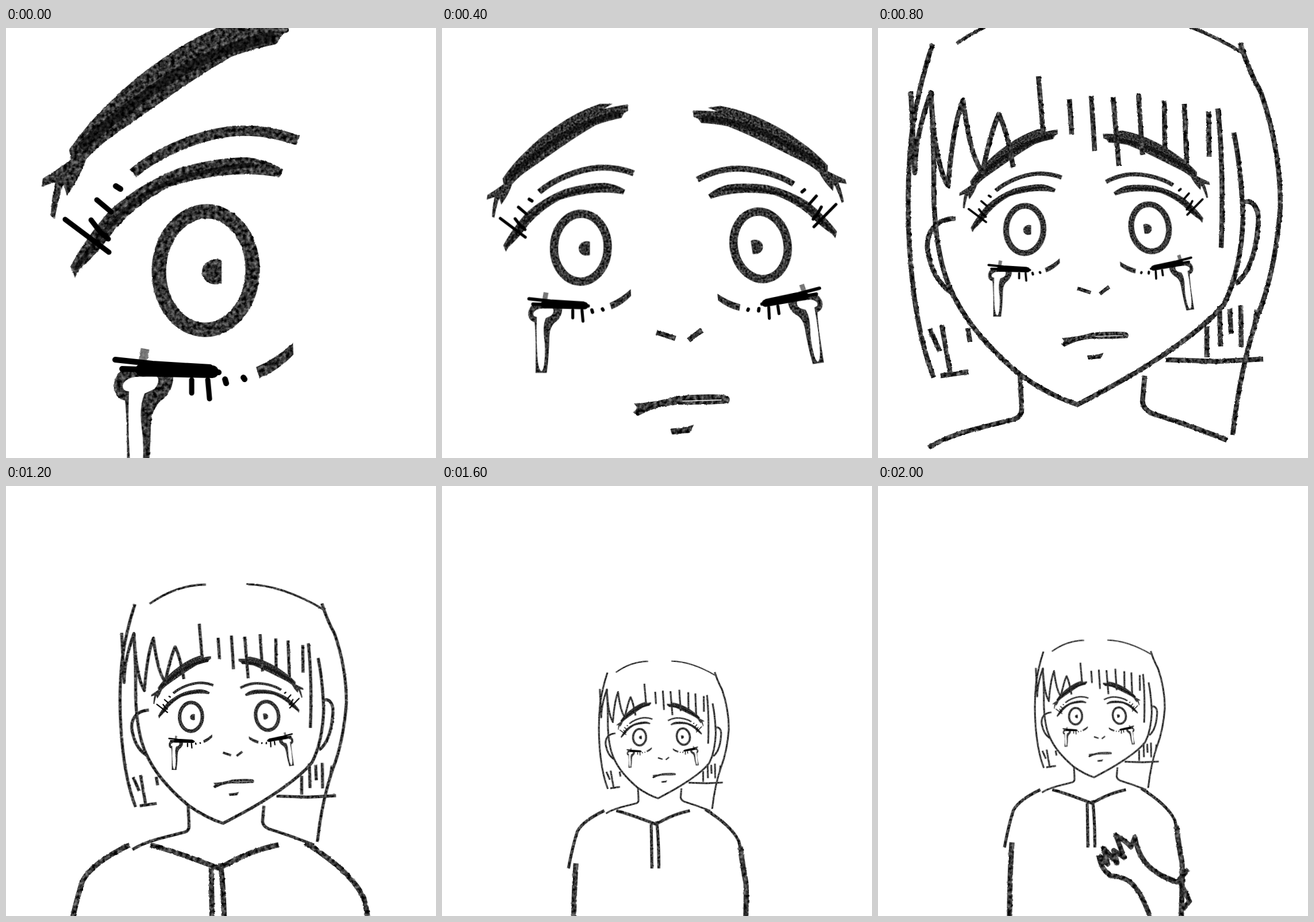
An HTML page without scripts for the animation above (2.4 s loop, 748 px wide and 748 px high).

```html
<!DOCTYPE html>
<html lang="en">
<head>
<meta charset="utf-8">
<title>Zooming out sketch</title>
<style>
  html, body { margin: 0; width: 100%; height: 100%; overflow: hidden; background: #fff; }
  svg { display: block; width: 100vw; height: 100vh; }
  path, ellipse { fill: none; stroke: #000; stroke-linecap: butt; stroke-linejoin: round; }
  .solid { fill: #000; stroke: none; }
  .gap { fill: #fff; stroke: none; }
  .pen path { stroke-linecap: round; }
  .chalk { filter: url(#chalk); }
  .shine { stroke: #fff; }

  /* hard cuts, each 400 ms */
  #cam, .step { animation: 2400ms step-end infinite; }
  #cam { animation-name: zoom; }
  .s1 { animation-name: s1; }
  .s2 { animation-name: s2; }
  .s3 { animation-name: s3; }
  .s4 { animation-name: s4; }
  .s5 { animation-name: s5; }
  @keyframes zoom {
    0% { transform: translate(-291.8px, -455.3px) scale(2.504); }
    16.66% { transform: translate(-124.8px, -120.5px) scale(1.4347); }
    33.33% { transform: none; }
    50% { transform: translate(166.5px, 188.5px) scale(.608); }
    66.66% { transform: translate(254.6px, 314.7px) scale(.349); }
    83.33% { transform: translate(254.6px, 278.2px) scale(.349); }
  }
  @keyframes s1 { 0% { visibility: hidden; } 16.66% { visibility: visible; } }
  @keyframes s2 { 0% { visibility: hidden; } 33.33% { visibility: visible; } }
  @keyframes s3 { 0% { visibility: hidden; } 50% { visibility: visible; } }
  @keyframes s4 { 0% { visibility: hidden; } 66.66% { visibility: visible; } }
  @keyframes s5 { 0% { visibility: hidden; } 83.33% { visibility: visible; } }
</style>
</head>
<body>
<svg viewBox="0 0 748 748">
  <defs>
    <!-- crayon: slightly rough edge plus soft pale grain -->
    <filter id="chalk" color-interpolation-filters="sRGB">
      <feTurbulence type="fractalNoise" baseFrequency=".16" numOctaves="4" seed="4" result="noise"/>
      <feColorMatrix in="noise" values="0 0 0 0 1  0 0 0 0 1  0 0 0 0 1  .95 0 0 0 -.27" result="grain"/>
      <feDisplacementMap in="SourceGraphic" in2="noise" scale="3" xChannelSelector="R" yChannelSelector="G" result="rough"/>
      <feComposite in="grain" in2="rough" operator="in" result="specks"/>
      <feMerge><feMergeNode in="rough"/><feMergeNode in="specks"/></feMerge>
    </filter>

    <g id="eye">
      <g class="chalk">
        <!-- brow -->
        <path class="solid" d="M110 212Q142 165 180 130Q225 85 270 55Q335 8 406 -15L444 -15L416 1L458 -8L490 -13L491 6L478 14L471 28Q430 36 392 50Q345 77 290 115L190 185Q160 205 139 229Q128 262 106 291L100 272Q92 292 85 331L78 328Q79 294 86 268L62 276L64 262Q90 246 113 229Z"/>
        <!-- crease and lid -->
        <path stroke-width="18" d="M221 253C265 214 340 184 400 179Q455 176 508 196"/>
        <path class="solid" d="M112 415Q138 366 180 318Q230 272 300 244Q365 225 420 225Q455 229 482 246L476 260Q440 253 395 255Q340 259 285 276Q232 303 190 350Q160 392 128 420L120 434Z"/>
        <ellipse cx="347.5" cy="422" rx="81.5" ry="103" stroke-width="25" transform="rotate(2 348 422)"/>
        <path class="solid" d="M375 404C360 398 341 408 341 424C341 442 360 450 375 444Z"/>
        <path class="solid" d="M435 590Q470 575 499 548L500 568Q475 595 441 609Z"/>
        <!-- tear -->
        <path stroke-width="15" stroke-opacity=".6" d="M238 580L242 558"/>
        <path class="solid" d="M200 596Q186 610 188 628Q192 645 207 648Q212 690 210 802L244 802Q251 750 252 690Q254 658 274 645Q290 632 291 606Z"/>
      </g>
      <path class="gap" d="M203 622Q206 610 225 607L262 606Q270 613 258 628L241 636Q231 660 236 695Q241 730 237 767Q235 795 227 797Q219 790 217 767Q211 700 214 632Q203 632 203 622Z"/>
      <!-- darker second pass -->
      <g opacity=".55">
        <path stroke-width="8" d="M122 418Q180 335 240 290Q310 248 432 238"/>
        <path stroke-width="18" d="M130 208Q200 142 300 78Q380 32 468 14"/>
      </g>
      <!-- lashes -->
      <g class="pen">
        <path stroke-width="9" d="M103 333L179 390M148 334L164 355L178 367M158 299L183 320M323 612V635M351 612L354 645"/>
        <path stroke-width="10" d="M191 275L199 280M190 577L255 584L355 590M202 593L370 599M381 611L383 618M413 608L415 611"/>
        <path stroke-width="22" d="M236 595L359 598"/>
      </g>
    </g>
  </defs>

  <rect width="748" height="748" fill="#fff"/>
  <g id="cam">
    <use href="#eye" transform="translate(116.5 181.8) scale(.3994)"/>

    <g class="step s1">
      <use href="#eye" transform="translate(473.5 347.5) rotate(-8.5) scale(-.3994 .3994) translate(-347 -422)"/>
      <g transform="translate(87 84) scale(.697)">
        <g class="chalk">
          <path stroke-width="9" d="M373 529L406 540M429 543L452 525"/>
          <path class="solid" d="M334 653Q370 652 410 640Q450 636 492 638Q505 642 498 653Q455 656 410 655Q375 658 355 668L340 675L332 668L340 661Z"/>
          <path class="solid" d="M397 697L425 694L438 690L432 704L400 707Z"/>
        </g>
        <path class="shine" stroke-width="1.5" d="M418 649L486 647"/>
      </g>
    </g>

    <g class="step s2">
      <g class="chalk" stroke-width="8.5">
        <!-- crown and sides -->
        <path stroke-width="6" d="M137 27Q215 -28 298 -28M414 -29Q515 -28 636 44"/>
        <path d="M95 28Q68 110 58 190Q45 320 62 460Q74 550 97 608"/>
        <path d="M630 26Q645 75 666 112Q700 210 700 310Q692 420 661 500Q630 590 617 708M659 490L655 520"/>
        <!-- fringe -->
        <path d="M57 110L64 252Q64 190 92 112Q98 235 122 275Q130 170 148 125Q160 225 182 250Q195 185 210 150Q225 180 235 242"/>
        <path d="M279 84L288 190M333 124L337 185M371 118L377 214M409 121L419 240M453 114L460 220M498 126L499 211M533 132L537 236M575 145L576 224M591 140Q602 240 597 382"/>
        <!-- face, ears, neck -->
        <path d="M92 112Q98 210 97 290Q100 400 128 458Q160 530 247 603Q300 640 347 655Q440 607 490 573Q570 520 602 480Q632 420 635 330Q632 245 619 182"/>
        <path d="M135 331C95 333 84 360 86 385Q95 440 128 460M632 304C652 294 665 315 661 345Q655 420 622 445"/>
        <path d="M247 600L250 662Q250 676 238 680L160 700Q115 713 88 730M464 605L460 650Q462 664 478 671Q540 690 607 717"/>
        <!-- hair ends -->
        <path d="M90 523L107 562M111 517L126 603M109 605L157 598M156 522L160 546M572 519V573M594 484L596 554M612 488L614 532M631 482L632 555M500 577L590 580L670 576"/>
      </g>
    </g>

    <g class="step s3" transform="translate(-273.8 -310) scale(1.645)">
      <g class="chalk" stroke-width="9">
        <path d="M215 624Q150 655 133 687Q119 730 106 799M520 620Q600 670 622 716Q630 745 634 790"/>
        <path d="M251 624Q290 634 368 664L378 661Q425 634 474 624M357 665L359 799M373 656Q380 710 380 799"/>
      </g>
    </g>

    <g transform="translate(-729.5 -797.1) scale(2.865)">
      <g class="step s4 chalk" stroke-width="9">
        <path d="M233 620Q228 690 229 795M519 592Q523 625 529 655Q530 690 526 795"/>
      </g>
      <g class="step s5 chalk" stroke-width="8.5">
        <path d="M384 642Q388 668 405 678Q432 680 445 695Q462 715 475 755"/>
        <path d="M384 642L400 658L392 630L416 656L410 634L428 646L414 608Q432 618 440 628L447 611Q450 635 465 655Q485 678 520 689L540 667M495 678L520 689M526 690L542 722L527 741"/>
      </g>
    </g>
  </g>
</svg>
</body>
</html>
```
